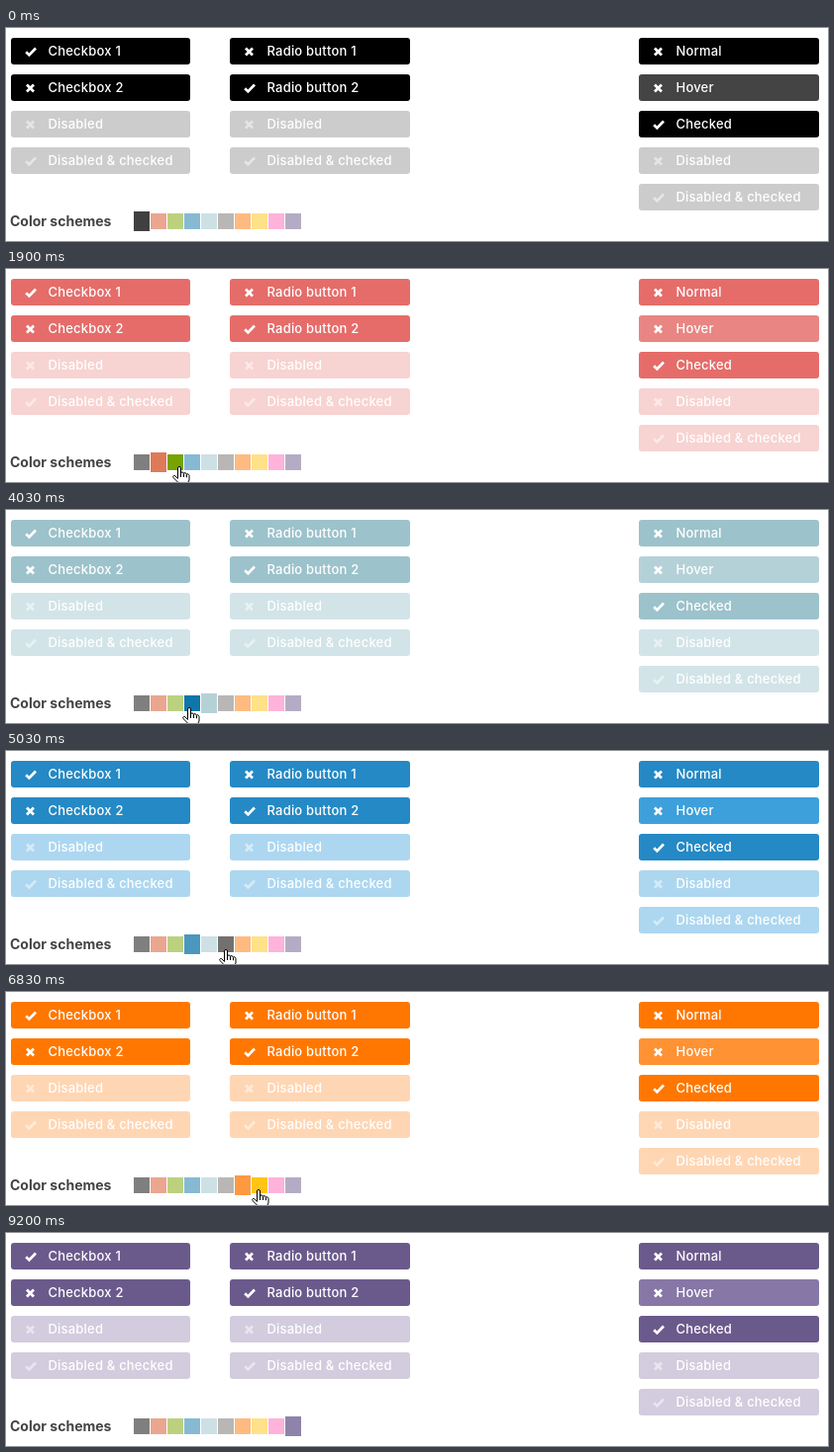
Recreate the animation shown at these times as an HTML page. Size 830 px wide and 216 px high, loop 9710 ms.

```html
<!DOCTYPE html>
<html lang="en">
<head>
<meta charset="utf-8">
<title>Color schemes</title>
<style>
html, body { margin: 0; width: 100%; height: 100%; overflow: hidden; background: #fff; }
body { position: relative; font-family: Inter, "Open Sans", sans-serif; }
.bar {
  position: absolute; height: 27px; border-radius: 3px; background: var(--base);
  color: #fff; font-size: 13px; font-weight: 500; line-height: 27px;
  letter-spacing: .2px; white-space: nowrap;
}
.bar span { position: absolute; left: 37.5px; top: 0; }
.bar svg { position: absolute; left: 13px; top: 8px; }
.bar path { fill: none; stroke: #fff; stroke-width: 2.7; }
.hover { background: var(--hover); }
.off { background: var(--off); }
.off svg { opacity: .5; }
h1 {
  position: absolute; left: 4px; top: 186px; margin: 0; color: #444;
  font-size: 14px; font-weight: 700; line-height: 20px; white-space: nowrap;
}
.swatch { position: absolute; top: 188px; width: 16px; height: 16px; opacity: .5; }
.swatch.active { top: 186px; height: 20px; }
#hand { position: absolute; left: 0; top: 0; }
</style>
</head>
<body>
<h1>Color schemes</h1>
<script>
const LOOP = 9710, FADE = 200;

// swatch, base, hover, disabled
const themes = [
  ['#000', '#000', '#444', '#ccc'],
  ['#d54e21', '#e56c69', '#e98582', '#f7d3d2'],
  ['#78a300', '#1b7e5a', '#24aa7a', '#89e6c4'],
  ['#0e76a8', '#2489c5', '#3da0db', '#add7f0'],
  ['#9cc2cb', '#9cc2cb', '#b5d1d8', '#d2e4e8'],
  ['#73716e', '#73716e', '#8b8986', '#d5d4d3'],
  ['#f70', '#f70', '#ff9233', '#ffd6b3'],
  ['#ffc414', '#ffc414', '#ffd34f', '#ffe495'],
  ['#ff66b5', '#a77a94', '#b995a9', '#e0d0da'],
  ['#6a5a8c', '#6a5a8c', '#8677a7', '#d2ccde']
];

// click time, rest time, clicked swatch, next hovered swatch, hand x, hand y
const steps = [
  [1470, 1900, 1, 2, 168, 200],
  [2470, 3200, 2, 4, 194, 198],
  [3430, 4030, 4, 3, 178, 200],
  [4470, 5030, 3, 5, 215, 201],
  [5370, 5900, 5, 6, 231, 200],
  [6330, 6830, 6, 7, 248, 200],
  [7370, 7830, 7, 8, 264, 200],
  [8230, 8700, 8, 9, 281, 200]
];

const columns = [
  [5, 181, ['Checkbox 1', 1], ['Checkbox 2', 0], ['Disabled', 0, 'off'], ['Disabled & checked', 1, 'off']],
  [226, 182, ['Radio button 1', 0], ['Radio button 2', 1], ['Disabled', 0, 'off'], ['Disabled & checked', 1, 'off']],
  [639, 182, ['Normal', 0], ['Hover', 0, 'hover'], ['Checked', 1], ['Disabled', 0, 'off'], ['Disabled & checked', 1, 'off']]
];
const icons = ['M3 2.5l7 7M10 2.5l-7 7', 'M2.2 6.2l3.2 3.2L12 2.5'];

function add(className, style, html = '') {
  const el = document.createElement('div');
  el.className = className;
  el.innerHTML = html;
  Object.assign(el.style, style);
  return document.body.appendChild(el);
}

for (const [x, width, ...rows] of columns) {
  rows.forEach(([text, checked, state = ''], i) => add(
    'bar ' + state,
    { left: x + 'px', top: 10 + 37 * i + 'px', width: width + 'px' },
    `<svg width="14" height="12"><path d="${icons[checked]}"/></svg><span>${text.replace('&', '&amp;')}</span>`
  ));
}

const swatches = themes.map(([color], i) => add('swatch', { left: 129 + 17 * i + 'px', background: color }));

const hand = add('', {}, `<svg width="19" height="24" style="display:block" fill="#fff" stroke="#000">
  <path d="M5.5 12.5V2q0-1.5 1.5-1.5T8.5 2V7q0-1.2 1.5-1t1.5 1.4q.2-.9 1.5-.6t1.5 1.5q.3-.8 1.3-.4t1.2 1.5V14L15 18V21.5H7.5V18L.9 11.5Q.3 10 1.5 9.5T4 11Z"/>
  <path d="M8.5 7v4M11.5 7.4v3.6M14.5 8.3v3" fill="none"/></svg>`);
hand.id = 'hand';

// events: time, active swatch, hovered swatch; moves: start, end, x, y
const events = [[0, 0, -1], [900, 0, 1]];
const moves = [[730, 1000, 151, 200]];
for (const [click, rest, pick, next, x, y] of steps) {
  const start = click + 150, enter = rest - FADE;
  events.push([click, pick, pick]);
  if (Math.abs(next - pick) > 1) events.push([(start + enter) / 2, pick, (pick + next) / 2]);
  events.push([enter, pick, next]);
  moves.push([start, rest - 100, x, y]);
}
events.push([9000, 9, 9], [9100, 9, -1]);
moves.push([9020, 9180, 284, 218]);

const clamp = v => Math.min(1, Math.max(0, v));
const smooth = v => v * v * (3 - 2 * v);
const mix = (a, b, k) => a + (b - a) * k;

function opacity(i, t) {
  let from = .5, to = i ? .5 : .75, since = -FADE;
  const at = time => mix(from, to, smooth(clamp((time - since) / FADE)));
  for (const [time, active, hovered] of events) {
    if (time > t) break;
    const goal = i === active ? .75 : i === hovered ? 1 : .5;
    if (goal !== to) [from, to, since] = [at(time), goal, time];
  }
  return at(t);
}

function handAt(t) {
  let x = 151, y = 218;
  for (const [start, end, toX, toY] of moves) {
    const k = smooth(clamp((t - start) / (end - start)));
    x = mix(x, toX, k);
    y = mix(y, toY, k);
  }
  return [x, y];
}

function draw(t) {
  const active = events.filter(e => e[0] <= t).pop()[1];
  const root = document.documentElement.style;
  ['--base', '--hover', '--off'].forEach((name, i) => root.setProperty(name, themes[active][i + 1]));
  swatches.forEach((el, i) => {
    el.classList.toggle('active', i === active);
    el.style.opacity = opacity(i, t);
  });
  const [x, y] = handAt(t).map(Math.round);
  hand.style.transform = `translate(${x}px, ${y}px)`;
}

let begin;
function tick(now) {
  begin ??= now;
  draw((now - begin) % LOOP);
  requestAnimationFrame(tick);
}
draw(0);
requestAnimationFrame(tick);
</script>
</body>
</html>
```
